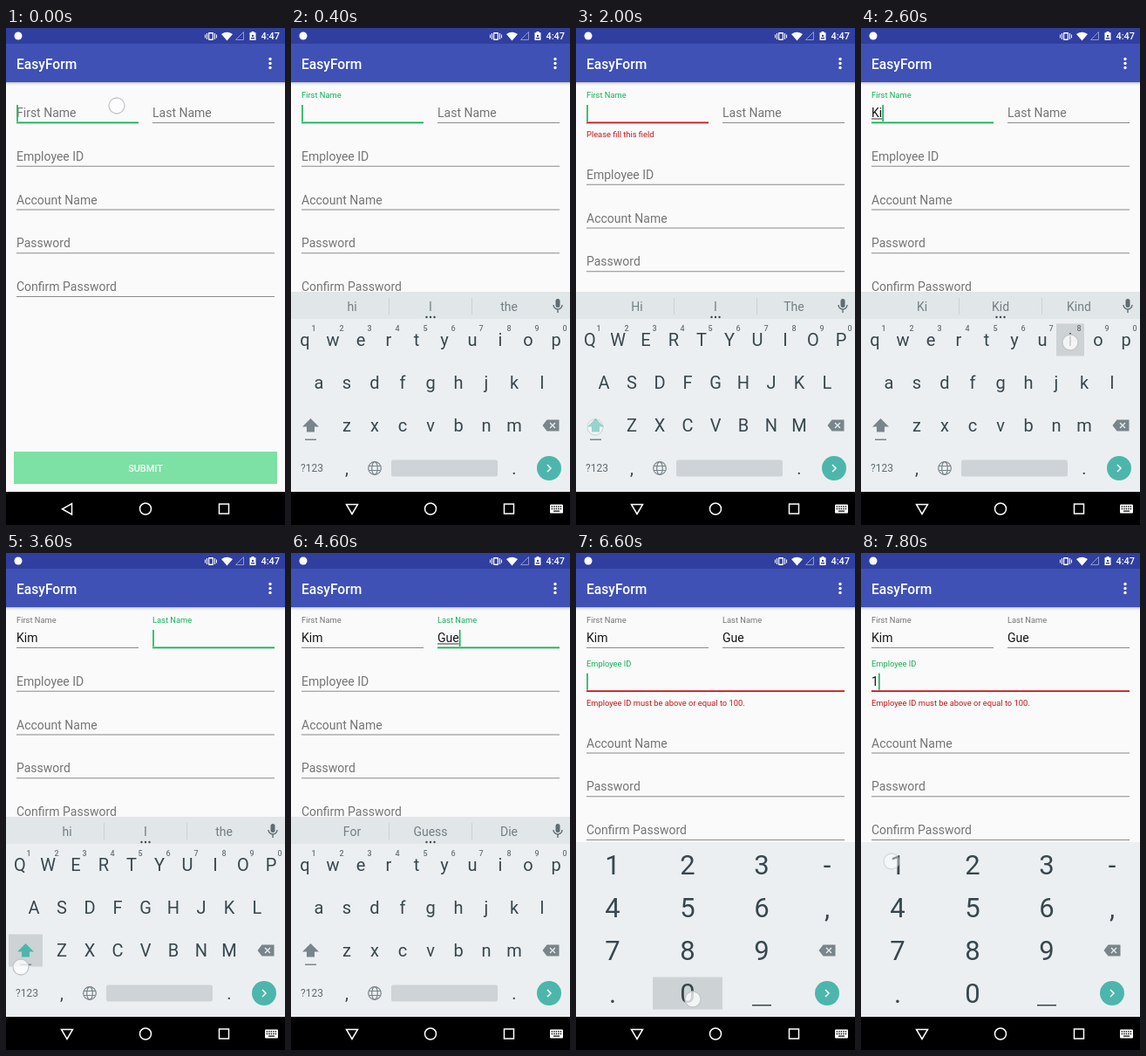
These frames come from a looping animation (320 px wide and 569 px high, 8 s). An HTML page:

```html
<!DOCTYPE html>
<html lang="en">
<head>
<meta charset="utf-8">
<title>Form validation</title>
<style>
html, body { margin: 0; width: 100%; height: 100%; overflow: hidden; background: #fafafa; }
svg { display: block; width: 320px; height: 569px; font-family: Roboto, sans-serif; }
</style>
</head>
<body>
<svg id="stage" viewBox="0 0 320 569"></svg>
<script>
const STEP = 200, LOOP = 8000;
const GREEN = '#12b057', RED = '#c4161c', GREY = '#757575', TEAL = '#4db6ac', INK = '#37474f', ICON = '#78858b';
const stage = document.getElementById('stage');
const pen = document.createElement('canvas').getContext('2d');

// Drawing helpers
const text = (x, y, str, size, fill, anchor = 'start', weight = 400) =>
  `<text x="${x}" y="${y}" font-size="${size}" fill="${fill}" text-anchor="${anchor}" font-weight="${weight}">${str}</text>`;
const rect = (x, y, w, h, fill, r = 0) =>
  `<rect x="${x}" y="${y}" width="${w}" height="${h}" fill="${fill}" rx="${r}"/>`;
const path = (d, fill, stroke = 'none', width = 1) =>
  `<path d="${d}" fill="${fill}" stroke="${stroke}" stroke-width="${width}"/>`;
const circle = (x, y, r, fill, stroke = 'none', width = 1) =>
  `<circle cx="${x}" cy="${y}" r="${r}" fill="${fill}" stroke="${stroke}" stroke-width="${width}"/>`;
const textWidth = str => {
  pen.font = '14px Roboto, sans-serif';
  return pen.measureText(str).width;
};

const fields = [
  ['First Name', 12, 140, 0], ['Last Name', 168, 140, 0], ['Employee ID', 12, 296, 1],
  ['Account Name', 12, 296, 2], ['Password', 12, 296, 3], ['Confirm Password', 12, 296, 4],
];

const start = {
  board: '', slide: 0, caps: false, focus: 0, lift: 0, values: ['', '', ''],
  error: '', hints: ['hi', 'I', 'the'], touch: null, key: null, cursor: true,
};
const LOWER = start.hints, UPPER = ['Hi', 'I', 'The'];
const typed = (a = '', b = '', c = '') => [a, b, c];
const idle = { touch: null, key: null };
const press = (x, y, w = 32, tx = x, ty = y + 3) => ({ key: [x, y, w], touch: [tx, ty, 1] });
const fade = (x, y) => ({ key: null, touch: [x, y, .55] });

// State changes, keyed by step
const script = {
  0: { touch: [127, 89, 1] },
  1: { board: 'abc', slide: 100, lift: .6, ...fade(127, 89) },
  2: { slide: 0, lift: 1, ...idle },
  4: press(32, 406),
  5: { values: typed('a'), hints: ['and', 'I', 'as'], ...idle },
  6: { touch: [297, 458, .55] },
  7: press(297, 455, 42),
  8: { values: typed(), hints: LOWER, error: 'Please fill this field', ...idle },
  9: press(22, 455, 39),
  10: { caps: true, hints: UPPER, ...fade(22, 457) },
  11: press(256, 406),
  12: { values: typed('K'), caps: false, error: '', hints: ['K', 'I', 'Know'], ...fade(256, 409) },
  13: { values: typed('Ki'), hints: ['Ki', 'Kid', 'Kind'], ...press(240, 357) },
  14: { values: typed('Kim'), ...press(256, 455) },
  16: { focus: 1, lift: .5, hints: LOWER, key: null, touch: [236, 97, 1] },
  17: { lift: 1, ...idle },
  18: { caps: true, ...press(22.5, 455, 39, 17, 474) },
  19: { hints: UPPER, ...fade(17, 474) },
  20: press(160, 406),
  21: { values: typed('Kim', 'G'), caps: false, hints: ['G', 'Get', 'Go'], ...idle },
  22: { values: typed('Kim', 'Gu'), hints: ['Gum', 'Guy', 'Gut'], ...press(208, 357) },
  23: { values: typed('Kim', 'Gue'), hints: ['For', 'Guess', 'Die'], ...idle },
  24: press(296, 504, 42),
  25: { focus: 2, board: 'num', ...idle },
  27: { cursor: false },
  29: { cursor: true, ...press(42, 357, 80) },
  30: { values: typed('Kim', 'Gue', '1'), error: 'Employee ID must be above or equal to 100.', ...fade(42, 360) },
  31: press(287, 455, 60),
  32: { values: typed('Kim', 'Gue'), ...idle },
  33: press(128, 504, 80, 134, 511),
  34: { values: typed('Kim', 'Gue', '0'), ...fade(134, 511) },
  35: idle,
  36: { touch: [289, 457, 1] },
  37: { values: typed('Kim', 'Gue'), ...idle },
  38: press(42, 357, 80, 35, 353),
  39: { values: typed('Kim', 'Gue', '1'), ...fade(35, 353) },
};

const states = [];
for (let i = 0; i < LOOP / STEP; i++) states[i] = { ...(states[i - 1] || start), ...script[i] };

function header() {
  return rect(0, 18, 320, 44, '#3f51b5') + rect(0, 0, 320, 18, '#303f9f') +
    [.2, .11, .05, .02].map((a, i) => rect(0, 62 + i, 320, 1, `rgba(0,0,0,${a})`)).join('') +
    text(12, 46.5, 'EasyForm', 15.6, '#fff', 'start', 500) +
    [35.5, 40.5, 45.5].map(y => circle(303, y, 1.7, '#fff')).join('') +
    circle(14, 9, 4.5, '#fff') +
    rect(232, 5, 6, 9, '#fff', 1) + rect(233.2, 6.5, 3.6, 6, '#303f9f') +
    path('M230.5 6v7M239.5 6v7M228.5 7.5v4M241.5 7.5v4', 'none', '#fff', 1) +
    path('M247 7Q253.500 2.500 260 7L253.500 14.500Z', '#fff') +
    path('M263.500 13.500H272.500V4.500Z', 'none', '#8f98cf', 1) +
    path('M281.500 4h3v1.200h2V14h-7V5.200h2Z', '#fff') + circle(283, 9, 1.2, '#303f9f') +
    rect(281, 11, 4, 1.4, '#303f9f') +
    text(314, 13, '4:47', 10.9, '#fff', 'end', 500);
}

function field([label, x, w, row], i, s) {
  const on = s.focus === i, value = s.values[i] || '', bad = on && s.error;
  const errorRow = s.error ? fields[s.focus][3] : 9;
  const dy = row * 49.75 + (row > errorRow ? 21 : 0);
  const lift = on ? s.lift : value ? 1 : 0;
  const base = 102 + dy, edge = x + textWidth(value);
  let out = text(x, base - 22 * lift, label, 14 - 4.67 * lift, on && lift ? GREEN : GREY);
  out += on ? rect(x, 107.5 + dy, w, 1.8, bad ? RED : GREEN) : rect(x, 108 + dy, w, 1, '#8a8a8a');
  if (value) out += text(x, base, value, 14, '#161616');
  if (on && value && i < 2) out += rect(x, base + 1.5, edge - x, 1, '#333');
  if (on && s.cursor) out += rect(edge + .2, 88 + dy, 1.6, 19, GREEN);
  if (bad) out += text(x, 125 + dy, s.error, 9.33, RED);
  return out;
}

const enterKey = x => circle(x, 504, 14, TEAL) + path(`M${x - 2} 500l4 4l-4 4`, 'none', '#fff', 1.5);
const deleteKey = x => path(`M${x - 9.5} 455l5-6.500h14v13h-14Z`, ICON) +
  path(`M${x - 1} 452l6 6m0-6l-6 6`, 'none', '#eceff1', 1.3);
const keyRow = (chars, x, y) => [...chars].map((c, i) => text(x + 32 * i, y, c, 20, INK, 'middle')).join('');

function letters(s) {
  const fix = str => s.caps ? str.toUpperCase() : str;
  const shift = s.caps ? TEAL : ICON;
  return rect(0, 302, 320, 31, '#e1e6e8') +
    s.hints.map((h, i) => text(70 + 90 * i, 324, h, 14, '#737f85', 'middle')).join('') +
    rect(112, 309, 1, 19, '#ccd2d5') + rect(207, 309, 1, 19, '#ccd2d5') +
    [155.5, 160, 164.5].map(x => circle(x, 331, 1.2, INK)).join('') +
    rect(303.5, 310, 5, 10, '#5f6c72', 2.5) +
    path('M301 317a5 5 0 0 0 10 0M306 322v4', 'none', '#5f6c72', 1.4) +
    keyRow(fix('qwertyuiop'), 16, 364) + keyRow(fix('asdfghjkl'), 32, 413) + keyRow(fix('zxcvbnm'), 64, 462) +
    [...'1234567890'].map((c, i) => text(26 + 32 * i, 347, c, 9, '#68757b', 'middle', 500)).join('') +
    path('M22.500 447l9.500 9.500h-5v6h-9v-6h-5Z', shift) + rect(16, 470.5, 13, 1.5, ICON) +
    deleteKey(298) + text(24, 508, '?123', 12, '#5f6c72', 'middle') +
    text(64, 511, ',', 20, INK, 'middle') + text(256, 511, '.', 20, INK, 'middle') +
    circle(96, 504, 7.3, 'none', ICON, 1.2) +
    `<ellipse cx="96" cy="504" rx="3.300" ry="7.300" fill="none" stroke="${ICON}" stroke-width="1.200"/>` +
    path('M89.500 501.500h13M89.500 506.500h13', 'none', ICON, 1.2) +
    rect(115, 494.5, 122, 19, '#cdd3d6', 2) + enterKey(296);
}

function digits() {
  const xs = [42, 128, 213, 288];
  return ['123-', '456,', '789', '.0'].map((row, r) =>
    [...row].map((c, i) => text(xs[i], 368 + 49 * r, c, 31, INK, 'middle')).join('')).join('') +
    rect(202, 517, 22, 1.5, INK) + deleteKey(288) + enterKey(288);
}

function keyboard(s) {
  const top = s.board === 'abc' ? 302 : 331;
  const key = s.key ? rect(s.key[0] - s.key[2] / 2, s.key[1] - 18.5, s.key[2], 37, '#cdd2d4') : '';
  return `<g transform="translate(0 ${s.slide})">` + rect(0, top, 320, 531 - top, '#eceff1') +
    key + (s.board === 'abc' ? letters(s) : digits()) + '</g>';
}

function navBar(open) {
  const back = open ? 'M63.500 545.500h13l-6.500 11Z' : 'M75.500 544.500v12.500l-11-6.250Z';
  let out = rect(0, 531, 320, 38, '#000') + path(back, 'none', '#fff', 1.5) +
    circle(160, 550.5, 6.5, 'none', '#fff', 1.5) + path('M244.500 545h11v11h-11Z', 'none', '#fff', 1.5);
  if (open) {
    out += rect(297, 545.5, 15, 10, '#fff', 1) + rect(301, 552.5, 7, 1.2, '#000');
    for (let i = 0; i < 10; i++) out += rect(298.7 + 2.5 * (i % 5), 547.2 + 2.6 * (i / 5 | 0), 1.4, 1.4, '#000');
  }
  return out;
}

function finger([x, y, alpha]) {
  return `<g opacity="${alpha}">` + circle(x, y, 9, 'rgba(255,255,255,.75)', '#c3c6ca', 1.3) + '</g>';
}

function draw(s) {
  stage.innerHTML = rect(0, 0, 320, 569, '#fafafa') +
    fields.map((f, i) => field(f, i, s)).join('') +
    (s.board && !s.slide ? '' : rect(9, 485, 302, 37, '#7de0a5') +
      text(160, 508, 'SUBMIT', 10.9, '#fff', 'middle', 500)) +
    header() + (s.board ? keyboard(s) : '') + navBar(s.board) + (s.touch ? finger(s.touch) : '');
}

let shown = -1;
function tick(now) {
  const step = Math.floor(now % LOOP / STEP);
  if (step !== shown) draw(states[shown = step]);
  requestAnimationFrame(tick);
}
tick(0);
</script>
</body>
</html>
```
